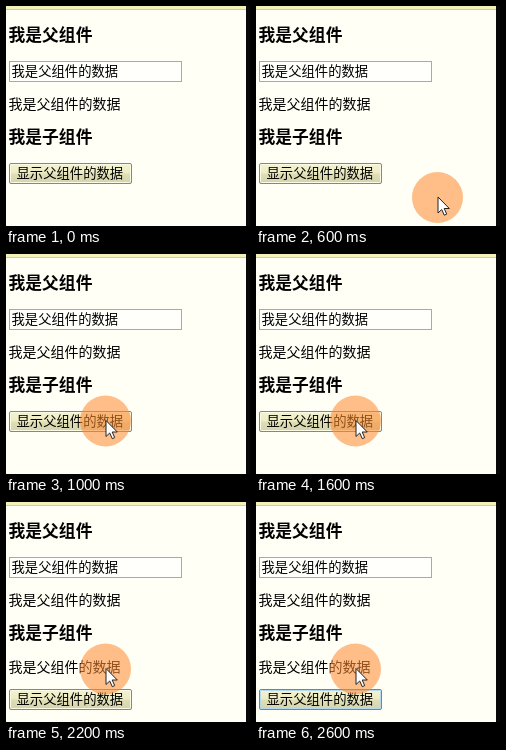
Animation, 244 px wide and 220 px high, one loop 2.8 s. Source, as an HTML page:

```html
<!DOCTYPE html>
<html lang="zh-CN">
<head>
<meta charset="utf-8">
<style>
  html, body { margin: 0; width: 100%; height: 100%; overflow: hidden; background: #fffff6; }
  svg { display: block; width: 244px; height: 220px; }
  text { font: 14px "Noto Sans CJK SC", "Noto Sans CJK", sans-serif; fill: #000; }
  .title { font-size: 16.8px; font-weight: 700; }
  .field { font-size: 13.33px; }
</style>
</head>
<body>
<svg viewBox="0 0 244 220">
  <defs>
    <linearGradient id="face" x2="0" y2="1">
      <stop offset="0" stop-color="#f5f4d2"/>
      <stop offset=".48" stop-color="#ecebc2"/>
      <stop offset=".52" stop-color="#dfdeb4"/>
      <stop offset="1" stop-color="#d4d3ae"/>
    </linearGradient>
  </defs>
  <rect width="244" height="220" fill="#fffff6"/>
  <rect width="240" height="3" fill="#f4f1b8"/>
  <rect y="3" width="240" height="1" fill="#d6cf8a"/>
  <rect id="edge" x="240" width="4" height="220" fill="#080808"/>
  <rect id="corner" x="240" width="4" height="4" fill="#7fa3c4"/>

  <text class="title" x="2.5" y="35">我是父组件</text>
  <rect x="3.5" y="55.5" width="172" height="20" fill="#fffffc" stroke="#aaaaa4"/>
  <text class="field" x="5.5" y="70">我是父组件的数据</text>
  <text x="2.5" y="103">我是父组件的数据</text>
  <text class="title" x="2.5" y="137">我是子组件</text>
  <text id="message" x="2.5" y="170">我是父组件的数据</text>

  <g id="button">
    <rect id="rim" x="3.5" y="157.5" width="122" height="20" rx="1.5" fill="url(#face)" stroke="#85897c"/>
    <rect id="glow" x="4.5" y="158.5" width="120" height="18" rx="1" fill="none" stroke="#fafae6"/>
    <text class="field" x="10.5" y="171.5">显示父组件的数据</text>
  </g>

  <g id="pointer">
    <circle r="25.5" fill="#ff8a30" opacity=".56"/>
    <path d="M.5 -.5V15.5L4.2 12L6.8 17.7L9.2 16.6L6.7 11H11.8Z" fill="#fff" stroke="#222"/>
  </g>
</svg>
<script>
  const $ = id => document.getElementById(id);
  const set = (id, name, value) => $(id).setAttribute(name, value);
  const show = (id, on) => set(id, 'visibility', on ? 'visible' : 'hidden');

  // Pointer stops: [start in ms, x, y]
  const stops = [[600, 181.5, 191.5], [800, 125.5, 173.5], [1000, 99.5, 167]];

  function draw() {
    const t = performance.now() % 2800;
    const stop = stops.filter(s => s[0] <= t).pop();
    show('pointer', stop);
    if (stop) set('pointer', 'transform', `translate(${stop[1]} ${stop[2]})`);

    const clicked = t >= 1800;
    show('message', clicked);
    set('button', 'transform', `translate(0 ${clicked ? 30 : 0})`);

    // The focused button turns blue in two steps
    const focus = t >= 2600 ? 2 : t >= 2400 ? 1 : 0;
    set('rim', 'stroke', ['#85897c', '#7088a2', '#5b87c8'][focus]);
    set('glow', 'stroke', ['#fafae6', '#d9e9ea', '#b4d8ee'][focus]);

    // The window edge is briefly uncovered at the top
    const uncovered = t >= 800 && t < 1000;
    show('corner', uncovered);
    set('edge', 'y', uncovered ? 16 : 0);
    requestAnimationFrame(draw);
  }
  draw();
</script>
</body>
</html>
```
